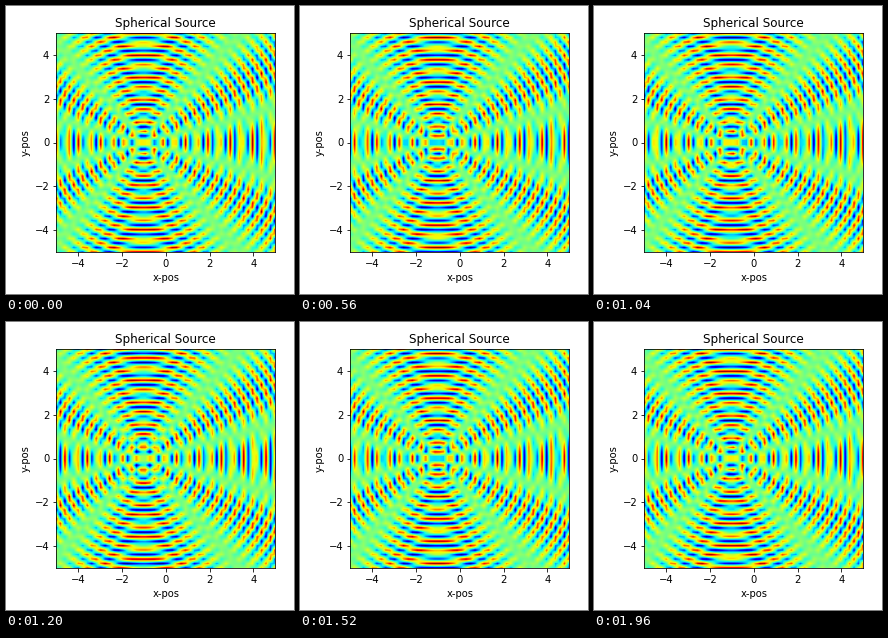
Recreate the animation shown at these times as a matplotlib script. Size 288x288 px, loop 2 s.

```python
import numpy as np
import matplotlib.pyplot as plt
from matplotlib.animation import FuncAnimation

SIZE, DPI = 288, 72
FRAMES, INTERVAL = 50, 40
HALF = 5.0
N = 50
WAVELENGTH = 0.5
CYCLES = 2
SOURCES = [(-1.0, 0.5), (-1.0, -0.5)]

plt.rcParams.update({"font.family": "DejaVu Sans", "font.size": 10})

axis = np.linspace(-HALF, HALF, N)
X, Y = np.meshgrid(axis, axis)
dists = [np.hypot(X - x, Y - y) for x, y in SOURCES]
phases = np.linspace(0, 2 * np.pi * CYCLES, FRAMES)


def wave(i):
    k = 2 * np.pi / WAVELENGTH
    return sum(np.cos(k * r - phases[i]) for r in dists)


fig = plt.figure(figsize=(SIZE / DPI, SIZE / DPI), dpi=DPI, facecolor="white")
side = 219 / SIZE
ax = fig.add_axes([50.3 / SIZE, 42 / SIZE, side, side])

# Cell centres sit on the grid points, so the outer half cells are cut off.
edge = HALF + (axis[1] - axis[0]) / 2
img = ax.imshow(wave(0), cmap="jet", vmin=-2, vmax=2, origin="lower",
                extent=[-edge, edge, -edge, edge], interpolation="bilinear")
ax.set(xlim=(-HALF, HALF), ylim=(-HALF, HALF))
ticks = range(-4, 5, 2)
ax.set_xticks(ticks)
ax.set_yticks(ticks)
ax.set_title("Spherical Source", fontsize=12)
ax.set_xlabel("x-pos")
ax.set_ylabel("y-pos")


def update(i):
    img.set_data(wave(i))
    return [img]


anim = FuncAnimation(fig, update, frames=FRAMES, interval=INTERVAL,
                     repeat=True, repeat_delay=0, blit=False)
plt.show()
```
